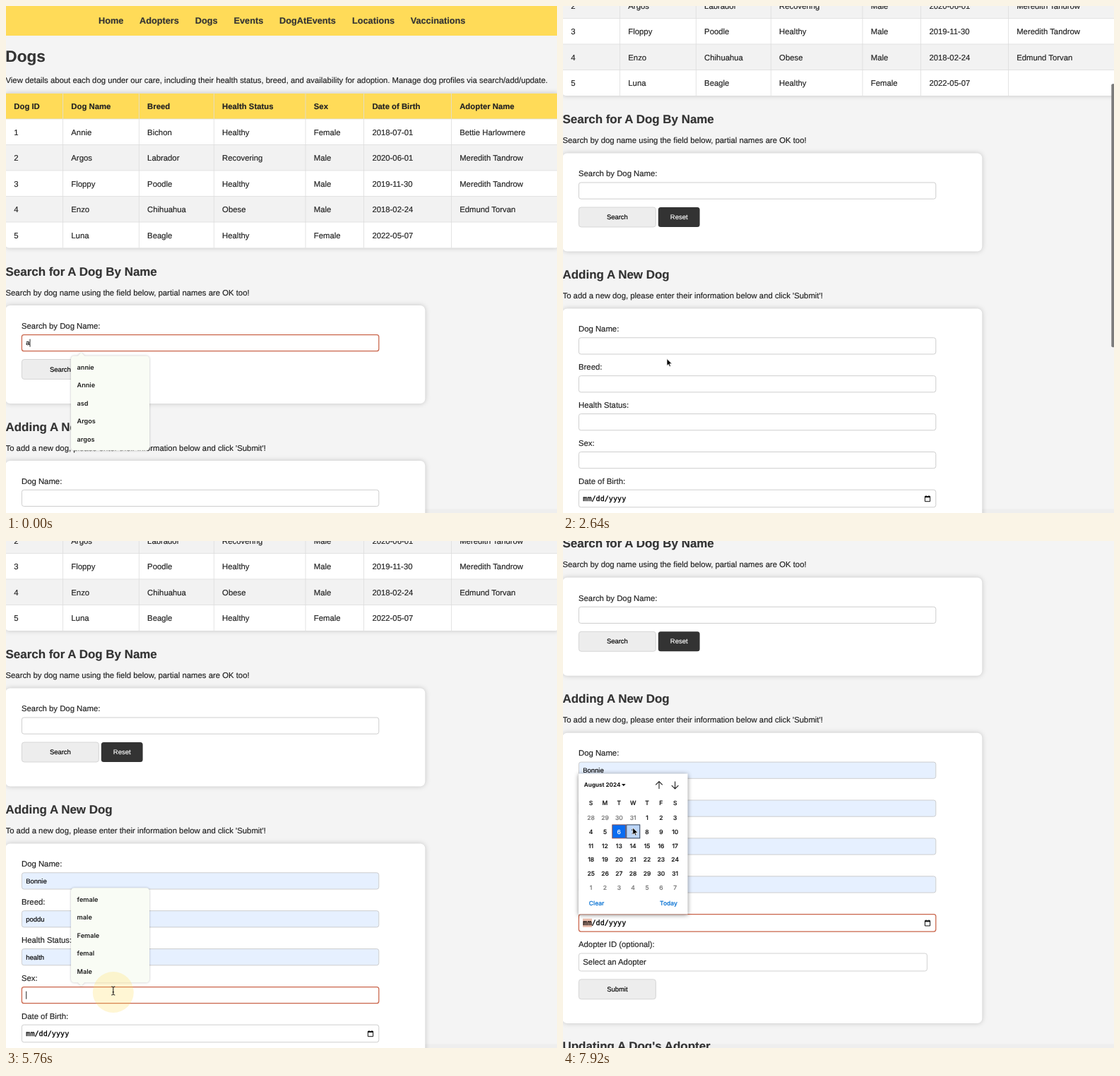
Recreate the animation shown at these times as an HTML page. Size 780 by 718 pixels, loop 8000 ms.

```html
<!DOCTYPE html>
<html lang="en">
<head>
<meta charset="utf-8">
<title>Dogs</title>
<style>
html, body { margin: 0; width: 100%; height: 100%; overflow: hidden; background: #f4f4f4; }
svg { display: block; width: 780px; height: 718px; font: 11.34px "Liberation Sans", Arial, sans-serif; --ink: #222; }
text { white-space: pre; text-rendering: geometricPrecision; fill: var(--ink); stroke: var(--ink); stroke-width: .16; }
.b { font-weight: 700; }
.nav { font-size: 12.72px; font-weight: 700; --ink: #333; }
.h1 { font-size: 22.6px; font-weight: 700; --ink: #333; }
.h2 { font-size: 16.95px; font-weight: 700; --ink: #333; }
.in { font-size: 9.45px; --ink: #000; }
.mono { font: 10.15px "DejaVu Sans Mono", monospace; --ink: #000; stroke-width: .3; }
.opt { font: 600 9.1px Inter, sans-serif; --ink: #1c1c1c; stroke-width: 0; }
.cal { font: 500 8.5px Inter, sans-serif; --ink: #111; }
.month { font-weight: 700; font-size: 8.1px; stroke-width: 0; }
.mid { text-anchor: middle; }
.card { fill: #fff; filter: drop-shadow(0 0 3.5px rgba(0,0,0,.2)); }
.pop { fill: #f9fcf5; filter: drop-shadow(0 .5px 1.5px rgba(0,0,0,.25)); }
</style>
</head>
<body>
<svg id="stage" viewBox="0 0 780 718"></svg>
<script>
const STEP = 80, LOOP = 8000;
const stage = document.getElementById('stage');

function el(parent, tag, attrs = {}, content) {
  const node = document.createElementNS('http://www.w3.org/2000/svg', tag);
  set(node, attrs);
  if (content !== undefined) node.textContent = content;
  parent.appendChild(node);
  return node;
}
function set(node, attrs) {
  for (const k in attrs) node.setAttribute(k, attrs[k]);
}
const text = (p, x, y, s, cls = '') => el(p, 'text', { x, y, class: cls }, s);
const rect = (p, x, y, width, height, attrs) => el(p, 'rect', { x, y, width, height, ...attrs });
const path = (p, d, attrs) => el(p, 'path', { d, ...attrs });
const show = (node, on) => set(node, { visibility: on ? 'visible' : 'hidden' });
const move = (node, x, y) => set(node, { transform: `translate(${x} ${y})` });
const tint = (node, color) => node.style.setProperty('--ink', color);

// Value of the last entry that has begun at time t
function at(t, list) {
  let value = list[0][1];
  for (const [start, v] of list) if (start <= t) value = v;
  return value;
}
// Eased value between [time, value] keys
function tween(t, keys, i = 1) {
  if (t <= keys[0][0]) return keys[0][i];
  for (let k = 1; k < keys.length; k++) {
    const a = keys[k - 1], b = keys[k];
    if (t < b[0]) {
      const u = (t - a[0]) / (b[0] - a[0]);
      return a[i] + (b[i] - a[i]) * u * u * (3 - 2 * u);
    }
  }
  return keys[keys.length - 1][i];
}

// ---- Page ----
rect(stage, 0, 0, 780, 718, { fill: '#f4f4f4' });
path(stage, 'M34 718Q40 712.5 52 712.5H780V718Z', { fill: '#eeeeee' });
const page = el(stage, 'g');

rect(page, 0, 0, 780, 42, { fill: '#ffdb58' });
[['Home', 131], ['Adopters', 189], ['Dogs', 267.8], ['Events', 322.5], ['DogAtEvents', 387],
 ['Locations', 490], ['Vaccinations', 572.7]].forEach(([s, x]) => text(page, x, 24.5, s, 'nav'));
text(page, -0.7, 78.5, 'Dogs', 'h1');
text(page, -0.5, 109, 'View details about each dog under our care, including their health status, breed, and availability for adoption. Manage dog profiles via search/add/update.');

const heads = ['Dog ID', 'Dog Name', 'Breed', 'Health Status', 'Sex', 'Date of Birth', 'Adopter Name'];
const dogs = [
  ['1', 'Annie', 'Bichon', 'Healthy', 'Female', '2018-07-01', 'Bettie Harlowmere'],
  ['2', 'Argos', 'Labrador', 'Recovering', 'Male', '2020-06-01', 'Meredith Tandrow'],
  ['3', 'Floppy', 'Poodle', 'Healthy', 'Male', '2019-11-30', 'Meredith Tandrow'],
  ['4', 'Enzo', 'Chihuahua', 'Obese', 'Male', '2018-02-24', 'Edmund Torvan'],
  ['5', 'Luna', 'Beagle', 'Healthy', 'Female', '2022-05-07', '']
];
const ROW = 36.5, HEAD = 123.5, LINE = .8;

function table(rows, edges) {
  const g = el(page, 'g'), height = (rows.length + 1) * ROW;
  rect(g, -1, HEAD, 784, height, { class: 'card', rx: 5 });
  [heads, ...rows].forEach((row, r) => {
    const y = HEAD + r * ROW;
    if (r % 2 === 0) rect(g, 0, y, 780, ROW, { fill: r ? '#f2f2f2' : '#ffdb58' });
    rect(g, 0, y - LINE / 2, 780, LINE, { fill: '#ddd' });
  });
  edges.forEach(x => rect(g, x - LINE / 2, HEAD, LINE, height, { fill: '#ddd' }));
  [heads, ...rows].forEach((row, r) => row.forEach((s, c) =>
    text(g, c ? edges[c - 1] + 11.8 : 11.3, 146 + r * ROW, s, r ? '' : 'b')));
  return g;
}
const fullTable = table(dogs, [80.5, 188.3, 294.3, 424, 506.6, 630.4]);
const hitTable = table(dogs.slice(0, 1), [83.6, 195.1, 276.4, 410.8, 496.6, 625]);

const lower = el(page, 'g');
function button(x, y, w, label, fill, ink) {
  const box = rect(lower, x, y, w, 28, { rx: 3.5, fill, stroke: ink === '#fff' ? 'none' : '#cfcfcf', 'stroke-width': .8 });
  tint(text(lower, x + w / 2, y + 17.1, label, 'in mid'), ink);
  return box;
}
function section(y, title, note, height) {
  text(lower, -0.5, y, title, 'h2');
  text(lower, -0.5, y + 28.2, note);
  rect(lower, -1, y + 42.5, 594.3, height, { class: 'card', rx: 7 });
}
section(381.5, 'Search for A Dog By Name', 'Search by dog name using the field below, partial names are OK too!', 139);
section(601.5, 'Adding A New Dog', "To add a new dog, please enter their information below and click 'Submit'!", 411.3);
text(lower, -0.5, 1093, "Updating A Dog's Adopter", 'h2');

const fields = [
  ['Search by Dog Name:', 465.5], ['Dog Name:', 685.3], ['Breed:', 739.2],
  ['Health Status:', 793.1], ['Sex:', 847], ['Date of Birth:', 900.7]
].map(([label, y], i) => {
  const h = i === 5 ? 24.6 : 23.2;
  text(lower, 22, y - 8.6, label);
  const box = rect(lower, 22.4, y, 505.4, h, { rx: 3 });
  const mark = i === 5 && rect(lower, 28, y + 6.3, 13, 12, { fill: '#ebbdac' });
  const value = text(lower, 28.3, y + (i === 5 ? 16 : 14.9), i === 5 ? 'mm/dd/yyyy' : '', i === 5 ? 'mono' : 'in');
  return { y, h, box, mark, value };
});
path(lower, 'M512.4 910.2H519.6V917.2H512.4ZM514 908.6V910M518 908.6V910', { fill: 'none', stroke: '#111', 'stroke-width': 1 });
rect(lower, 512, 909.6, 8, 2, { fill: '#111' });
text(lower, 22, 947.2, 'Adopter ID (optional):');
rect(lower, 22.4, 956.2, 493, 25, { rx: 3, fill: '#fff', stroke: '#ccc', 'stroke-width': .9 });
text(lower, 28.3, 972.6, 'Select an Adopter');
button(22.4, 500.5, 109, 'Search', '#ededed', '#000');
const reset = button(134.8, 500.5, 58.8, 'Reset', '#333', '#fff');
button(22.4, 993, 109, 'Submit', '#ededed', '#000');
const caret = rect(lower, 0, 0, .9, 11, { fill: '#111' });

// ---- Overlays ----
const thumb = rect(stage, 776.3, 0, 5, 373, { rx: 2, fill: '#7b7b7b' });
const popup = el(stage, 'g');
const calendar = el(stage, 'g');
const halo = el(stage, 'circle', { r: 29, fill: '#ffdb58', 'fill-opacity': .26 });
const outline = { fill: '#000', stroke: '#fff', 'stroke-width': .8, 'stroke-linejoin': 'round' };
const cursors = {
  arrow: path(stage, 'M0 0V10L2.3 7.9 3.8 11.3 5.5 10.6 4 7.3H7.3Z', outline),
  beam: path(stage, 'M-2.5 -6Q0 -6 0 -4.5Q0 -6 2.5 -6M0 -4.5V4.5M-2.5 6Q0 6 0 4.5Q0 6 2.5 6M-1.2 1.8H1.2', { fill: 'none', stroke: '#111', 'stroke-width': 1 }),
  hand: path(stage, 'M0 0Q1.2 -.6 1.6 .8L2.4 4Q4 3.2 4.4 4.3Q5.8 3.7 6.2 4.8Q7.6 4.6 7.6 6V8.6L6.6 11.5H1.8L-1.8 7.2Q-1.6 5.8 0 6.6L-.8 1.2Z', { ...outline, fill: '#fff', stroke: '#111' })
};

function buildCalendar() {
  const g = calendar;
  rect(g, 22, 329.5, 154.5, 199, { fill: '#fff', style: 'filter:drop-shadow(0 1px 3px rgba(0,0,0,.45))' });
  text(g, 29.8, 348, 'August 2024', 'cal month');
  path(g, 'M83 344H88.6L85.8 347.2Z', { fill: '#111' });
  path(g, 'M136 351V340.5M131.2 345.3L136 340.5 140.8 345.3M158.6 340.5V351M153.8 346.2L158.6 351 163.4 346.2', { fill: 'none', stroke: '#222', 'stroke-width': 1.1 });
  const colX = c => 39.6 + c * 19.85;
  [...'SMTWTFS'].forEach((s, c) => text(g, colX(c), 374.2, s, 'cal mid'));
  rect(g, 69.8, 401.9, 19, 19, { fill: '#0a6cf1', stroke: '#8c4a45', 'stroke-width': .9 });
  calendar.hover = rect(g, 89.8, 401.9, 19, 19, { fill: '#bcd6f8', stroke: '#1b2c48', 'stroke-width': .9 });
  for (let i = 0; i < 42; i++) {
    const n = i - 3;
    const day = n < 1 ? n + 31 : n > 31 ? n - 31 : n;
    const color = n < 1 || n > 31 ? '#777' : n === 6 ? '#fff' : '#111';
    tint(text(g, colX(i % 7), 394.9 + Math.floor(i / 7) * 19.85, day, 'cal mid'), color);
  }
  [['Clear', 47.6], ['Today', 149.5]].forEach(([s, x]) =>
    tint(text(g, x, 516, s, 'cal mid'), '#0b74d4'));
}
buildCalendar();

// ---- Timeline ----
const typed = [[0, 'a'], [80, 'an'], [160, 'ann'], [320, 'annie'], [560, '']];
const filled = [null, [3920, 'Bonnie'], [4480, 'poddu'], [5200, 'health'], [6080, 'female']];
const focusAt = [[0, 0], [560, -1], [3120, 1], [4000, 2], [4560, 3], [5600, 4], [7360, 5]];
const menuAt = [
  [0, ['annie', 'Annie', 'asd', 'Argos', 'argos']], [80, ['annie', 'Annie']], [560, null],
  [3120, ['annie', 'Annie', 'asd', 'Bonnie', 'Argos', 'argos']], [3920, null],
  [4000, ['bichone', 'poddu', '2024-11-10', 'Puddle', 'Chihuahua', 'Labrador']], [4480, null],
  [4560, ['healthy', 'Healthy', 'health', 'obese', 'Obese', 'recover']], [5200, null],
  [5680, ['female', 'male', 'Female', 'femal', 'Male']], [6080, null]
];
const scrollKeys = [[2240, 0], [2560, 215.5], [6160, 215.5], [6560, 355.3], [6800, 372.2]];
const thumbKeys = [[2240, 0], [2320, 1], [2960, 1], [3120, 0], [6160, 0], [6240, 1], [7120, 1], [7360, 0]];
const mouse = [
  [560, 560, 150], [1440, 156.5, 370.5], [1840, 156.5, 370.5], [2240, 147, 499.5], [2640, 147, 499.5],
  [2960, 150, 482], [3120, 150, 482], [3600, 104, 589], [3840, 104, 589], [4000, 90, 586.5],
  [4320, 112, 592], [4560, 112, 592], [5040, 118, 478], [5200, 118, 478], [5600, 151.8, 637],
  [5760, 151.8, 637], [5920, 118, 506], [6080, 118, 506], [6480, 192.7, 588.5], [6720, 192.7, 588.5],
  [7200, 515, 539], [7360, 515, 539], [7760, 98.7, 406]
];
const shapeAt = [
  [0, ''], [160, 'beam'], [640, 'arrow'], [1360, 'hand'], [1840, 'beam'], [2000, 'arrow'],
  [2880, 'beam'], [3200, 'arrow'], [5520, 'beam'], [5840, 'arrow']
];
const clicks = [[1680, 1840], [3040, 3120], [3840, 3920], [4400, 4480], [5120, 5200], [5600, 5840], [6000, 6080], [7280, 7440]];

function drawMenu(items, field, scroll, mx, my) {
  popup.replaceChildren();
  if (!items) return;
  const h = items.length * 25.5 + 6.5, above = field === fields[3] || field === fields[4];
  const top = field.y - scroll + (above ? -6.2 - h : field.h + 6.8);
  const tip = above ? `M101 ${top + h - 1}L106.5 ${top + h + 5}L112 ${top + h - 1}Z`
                    : `M101 ${top + 1}L106.5 ${top - 5}L112 ${top + 1}Z`;
  const body = el(popup, 'g', { class: 'pop' });
  rect(body, 92, top, 111, h, { rx: 4.5 });
  path(body, tip);
  items.forEach((s, i) => {
    const y = top + 3.2 + i * 25.5;
    if (mx > 92 && mx < 203 && my >= y && my < y + 25.5)
      rect(popup, 92, y, 111, 25.5, { fill: '#000', 'fill-opacity': .07 });
    text(popup, 100.6, y + 16.2, s, 'opt');
  });
}

function draw(t) {
  const hit = t >= 560 && t < 1840;
  const scroll = tween(t, scrollKeys);
  const mx = tween(t, mouse, 1), my = tween(t, mouse, 2);
  const focus = at(t, focusAt), shape = at(t, shapeAt);

  move(page, 0, -scroll);
  move(lower, 0, hit ? -4 * ROW : 0);
  show(fullTable, !hit);
  show(hitTable, hit);
  set(reset, { fill: shape === 'hand' ? '#555' : '#333' });

  fields.forEach((f, i) => {
    const auto = filled[i] && t >= filled[i][0];
    const on = i === focus;
    set(f.box, { fill: auto ? '#e6f0ff' : '#fff', stroke: on ? '#c9644a' : '#c9c9c9', 'stroke-width': on ? 1.25 : .9 });
    if (i < 5) f.value.textContent = i ? (auto ? filled[i][1] : '') : at(t, typed);
    else show(f.mark, on);
  });

  const field = fields[focus];
  const empty = field && focus < 5 && (focus === 0 || !field.value.textContent);
  show(caret, empty);
  if (empty) set(caret, { x: 28.3 + field.value.getComputedTextLength(), y: field.y + 6.2 });
  drawMenu(at(t, menuAt), field, scroll, mx, my);

  set(thumb, { y: scroll * .516 - 1, opacity: tween(t, thumbKeys) });
  show(calendar, t >= 7360);
  show(calendar.hover, t >= 7680);

  show(halo, clicks.some(([a, b]) => t >= a && t < b));
  move(halo, mx, my + 2);
  for (const name in cursors) {
    show(cursors[name], name === shape);
    move(cursors[name], mx, my);
  }
}

const start = performance.now();
function frame() {
  const t = (performance.now() - start) % LOOP;
  draw(Math.floor(t / STEP) * STEP);
  requestAnimationFrame(frame);
}
frame();
</script>
</body>
</html>
```
